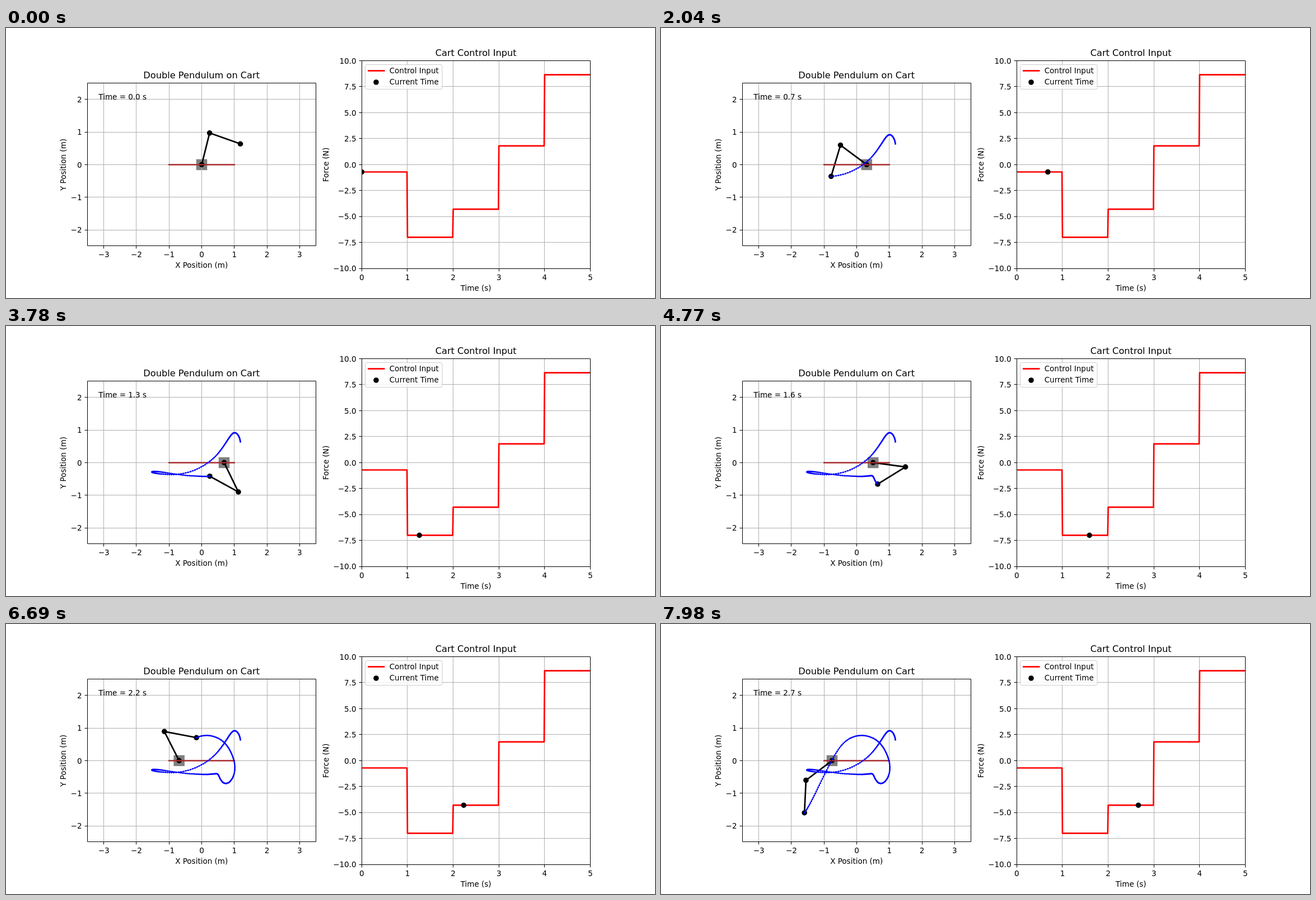
Write an HTML page that moves like this. It is 1159 px wide and 483 px high and loops after 8000 ms.

```html
<!DOCTYPE html>
<html lang="en">
<head>
<meta charset="utf-8">
<title>Double Pendulum on Cart</title>
<style>
html, body { margin: 0; width: 100%; height: 100%; overflow: hidden; background: #fff; }
svg { display: block; width: 1159px; height: 483px; }
text { font: 13.5px "DejaVu Sans", sans-serif; fill: #000; }
.title { font-size: 16.2px; }
.grid { stroke: #b0b0b0; stroke-width: 1; fill: none; }
.axis { stroke: #000; stroke-width: 1; fill: none; }
.bold { stroke-width: 2.7; fill: none; stroke-linejoin: round; }
</style>
</head>
<body>
<svg id="stage" viewBox="0 0 1159 483">
  <defs>
    <clipPath id="clipL"><rect x="145.5" y="98.5" width="408" height="291"/></clipPath>
    <clipPath id="clipR"><rect x="635.5" y="58.5" width="408" height="372"/></clipPath>
  </defs>
  <g clip-path="url(#clipL)">
    <rect id="cart" y="234.7" width="19.5" height="19.5" fill="#808080"/>
    <path id="gridL" class="grid"/>
    <g id="pendulum">
      <path id="rods" class="bold" stroke="#000"/>
      <circle r="4.8"/><circle r="4.8"/><circle r="4.8"/>
    </g>
    <path stroke="#a52a2a" stroke-width="2.4" d="M290 244.5H409"/>
    <path id="line" fill="none" stroke="#00f" stroke-width="1.1"/>
    <path id="dots" fill="none" stroke="#00f" stroke-width="3" stroke-linecap="round"/>
  </g>
  <text id="clock" x="165.3" y="127.7"></text>

  <g clip-path="url(#clipR)">
    <path id="gridR" class="grid"/>
    <path id="force" class="bold" stroke="#f00"/>
    <circle id="now" r="4.8"/>
  </g>
  <rect x="641.5" y="65.5" width="137.5" height="44" rx="3" fill="#fff" fill-opacity=".8" stroke="#ccc"/>
  <path class="bold" stroke="#f00" d="M646 76.5H676.5"/>
  <circle cx="661" cy="97" r="4.8"/>
  <text x="684.7" y="80.6">Control Input</text>
  <text x="684.7" y="100.8">Current Time</text>
</svg>
<script>
const $ = id => document.getElementById(id);
const stage = $('stage');
const STEP = 30, LOOP = 8000, FRAMES = 267, DT = 0.01;
const FORCES = [-0.71, -7, -4.3, 1.8, 8.65];

const mapX = x => 349.5 + 58.3 * x;
const mapY = y => 244.4 - 58.3 * y;
const timeX = t => 635.3 + 81.65 * t;
const forceY = f => 244.3 - 18.58 * f;
const snap = v => Math.floor(v) + 0.5;
const forceAt = t => FORCES[Math.min(4, Math.floor(t))];
const range = (from, to, step) =>
  Array.from({ length: Math.round((to - from) / step) + 1 }, (_, i) => from + i * step);

function add(name, attrs, content) {
  const el = document.createElementNS('http://www.w3.org/2000/svg', name);
  for (const k in attrs) el.setAttribute(k, attrs[k]);
  if (content) el.textContent = content;
  stage.append(el);
  return el;
}

function label(content, x, y, anchor = 'middle', cls = '') {
  return add('text', { x, y, 'text-anchor': anchor, class: cls }, content);
}

const number = (v, digits) => (v < 0 ? '\u2212' : '') + Math.abs(v).toFixed(digits);

function axes([l, t, r, b], xs, ys, xAt, yAt, digits, gridId) {
  let grid = '', ticks = '';
  for (const v of xs) {
    const x = snap(xAt(v));
    grid += `M${x} ${t}V${b}`;
    ticks += `M${x} ${b}v5`;
    label(number(v, 0), xAt(v), b + 20.4);
  }
  for (const v of ys) {
    const y = snap(yAt(v));
    grid += `M${l} ${y}H${r}`;
    ticks += `M${l} ${y}h-5`;
    label(number(v, digits), l - 10, yAt(v) + 5.2, 'end');
  }
  $(gridId).setAttribute('d', grid);
  add('path', { class: 'axis', d: `M${l} ${t}H${r}V${b}H${l}Z${ticks}` });
}

function captions(title, x, y, xName, xBase, yName, yBase) {
  label(title, x, y, 'middle', 'title');
  label(xName, x, xBase);
  label(yName, 0, 0).setAttribute('transform', `translate(${yBase} 244.5) rotate(-90)`);
}

axes([145.5, 98.5, 553.5, 389.5], range(-3, 3, 1), range(-2, 2, 1), mapX, mapY, 0, 'gridL');
axes([635.5, 58.5, 1043.5, 430.5], range(0, 5, 1), range(-10, 10, 2.5), timeX, forceY, 1, 'gridR');
captions('Double Pendulum on Cart', 349.2, 90, 'X Position (m)', 429, 'Y Position (m)', 107);
captions('Cart Control Input', 839.2, 50.2, 'Time (s)', 469.7, 'Force (N)', 576);

$('force').setAttribute('d', 'M' + range(0, 500, 1)
  .map(i => `${timeX(i * DT).toFixed(2)} ${forceY(forceAt(i * DT)).toFixed(2)}`).join('L'));

// Smooth curve through values spaced evenly in time, with quadratic ends
function curve(values, gap = 0.19) {
  const beyond = (a, b, c) => 3 * a - 3 * b + c;
  const p = [beyond(...values), ...values, beyond(...values.slice(-3).reverse())];
  return time => {
    const i = Math.min(values.length - 2, Math.floor(time / gap)), u = time / gap - i;
    const [a, b, c, d] = p.slice(i, i + 4);
    return b + u / 2 * (c - a + u * (2 * a - 5 * b + 4 * c - d + u * (3 * (b - c) + d - a)));
  };
}

// Cart in metres, rods in degrees clockwise from upright
const cartAt = curve([0, .04, .1, .22, .37, .52, .645, .69, .605, .265, -.145, -.515, -.733, -.77, -.755]);
const upperAt = curve([14, -2.5, -18.4, -37, -69, -122, -174, -222, -250.5, -285, -329, -357.5, -398, -441.5, -487]);
const lowerAt = curve([109.5, 94.8, 113, 158.5, 225.4, 284.5, 306, 290, 256, 203, 143, 107.5, 103, 135, 182.7]);

function pose(time) {
  const joints = [[cartAt(time), 0]];
  for (const angle of [upperAt(time), lowerAt(time)]) {
    const [x, y] = joints.at(-1), a = angle * Math.PI / 180;
    joints.push([x + Math.sin(a), y + Math.cos(a)]);
  }
  return joints.map(([x, y]) => [mapX(x), mapY(y)]);
}

const poses = range(0, FRAMES - 1, 1).map(i => pose(i * DT));
const trail = poses.map(p => p[2].map(v => v.toFixed(2)).join(' '));
const balls = [...$('pendulum').querySelectorAll('circle')];

function draw(ms) {
  const i = Math.min(FRAMES - 1, Math.floor((ms % LOOP) / STEP));
  const time = i * DT, points = poses[i], path = trail.slice(0, i + 1);
  $('cart').setAttribute('x', points[0][0] - 9.75);
  $('rods').setAttribute('d', 'M' + points.map(p => p.join(' ')).join('L'));
  balls.forEach((ball, k) => {
    ball.setAttribute('cx', points[k][0]);
    ball.setAttribute('cy', points[k][1]);
  });
  $('line').setAttribute('d', i ? 'M' + path.join('L') : '');
  $('dots').setAttribute('d', i ? path.map(p => `M${p}h.01`).join('') : '');
  $('now').setAttribute('cx', timeX(time));
  $('now').setAttribute('cy', forceY(forceAt(time)));
  $('clock').textContent = `Time = ${time.toFixed(1)} s`;
}

const start = performance.now();
function tick() {
  draw(performance.now() - start);
  requestAnimationFrame(tick);
}
tick();
</script>
</body>
</html>
```
